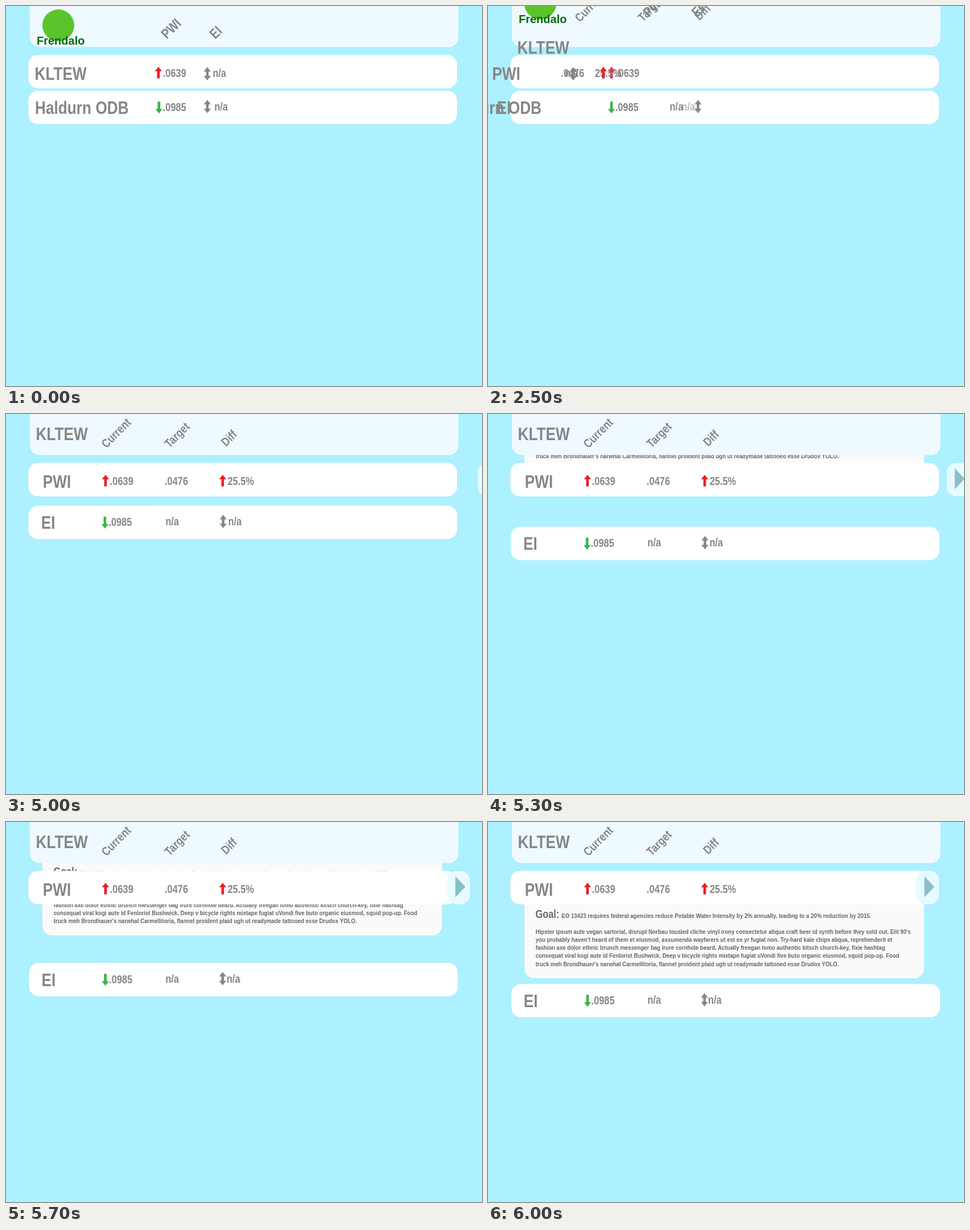
An HTML page that plays this animation: 837x669 px, repeating every 8 s.

```html
<!DOCTYPE html>
<html lang="en">
<head>
<meta charset="utf-8">
<title>Sustainability table</title>
<style>
  html, body { margin: 0; width: 100%; height: 100%; overflow: hidden; background: #adf0ff; }
  svg { display: block; width: 100%; height: 100%; }
  text { font-family: "Liberation Sans", Arial, sans-serif; font-weight: bold; white-space: pre; }
</style>
</head>
<body>
<svg id="stage" viewBox="0 0 837 669"></svg>
<script>
const GRAY = '#868686', RED = '#ed1c24', GREEN = '#39b54a';
const CONDENSE = 0.82; // one narrow face for the whole table
const STEPS = 11, STEP_MS = 100, LOOP_MS = 8000;
const stage = document.getElementById('stage');

const story = [
  "Hipster ipsum aute vegan sartorial, disrupt Norbau tousled cliche vinyl irony consectetur aliqua craft beer id synth before they sold out. Elit 90's",
  "you probably haven't heard of them et eiusmod, assumenda wayfarers ut est ex yr fugiat non. Try-hard kale chips aliqua, reprehenderit et",
  "fashion axe dolor ethnic brunch messenger bag irure cornhole beard. Actually freegan lomo authentic kitsch church-key, fixie hashtag",
  "consequat viral kogi aute id Fenlorist Bushwick. Deep v bicycle rights mixtape fugiat uVondi five buto organic eiusmod, squid pop-up. Food",
  "truck meh Brondhauer's narwhal Carmellitoria, flannel proident plaid ugh ut readymade tattooed esse Drudox YOLO."
];

const mix = (a, b, p) => a + (b - a) * p;

const text = (str, x, y, size = 20, { fill = GRAY, turn = 0, opacity = 1 } = {}) =>
  `<text transform="translate(${x} ${y}) rotate(${turn}) scale(${CONDENSE} 1)" font-size="${size}" fill="${fill}" opacity="${opacity}">${str}</text>`;
const slanted = (str, x, y, size) => text(str, x, y, size, { turn: -45 });
const box = (x, y, w, h, fill) =>
  `<rect x="${x}" y="${y}" width="${w}" height="${h}" rx="17" fill="${fill}"/>`;
const shift = (x, y, content) => `<g transform="translate(${x} ${y})">${content}</g>`;

// Arrows are placed by the centre of their top edge.
const path = (x, y, d, fill) => `<path transform="translate(${x} ${y})" d="${d}" fill="${fill}"/>`;
const up = (x, y) => path(x, y, 'M0 0L6.2 8H2.3V20.5H-2.3V8H-6.2Z', RED);
const down = (x, y) => path(x, y, 'M0 21L6.2 13H2.3V0H-2.3V13H-6.2Z', GREEN);
const both = (x, y) =>
  path(x, y, 'M0 0L6.2 8H2.2V15.5H6.2L0 23.5L-6.2 15.5H-2.2V8H-6.2Z', GRAY);

function panel() {
  return box(64, 120, 702.5, 155, '#fafafa') +
    text('Goal:', 83.5, 169, 20, { fill: '#6a6a6a' }) +
    text('EO 13423 requires federal agencies reduce Potable Water Intensity by 2% annually, leading to a 20% reduction by 2015.',
      129.3, 169, 11.75, { fill: '#666' }) +
    story.map((line, i) => text(line, 83.7, 197 + i * 14.15, 11.75, { fill: '#666' })).join('');
}

// p: overview to detail, q: detail row unfolding
function draw(p, q) {
  const to = (a, b) => mix(a, b, p);
  const then = (a, b) => mix(a, b, q);

  const oldHeader = shift(0, to(0, -70),
    '<circle cx="92" cy="34" r="28" fill="#5bc42b"/>' +
    '<text x="54" y="68" font-size="20" fill="#006b0c">Frendalo</text>' +
    slanted('PWI', 282.7, 59, 24.5) + slanted('EI', 368, 59, 24.5));
  const newHeader = shift(to(-33, 0), to(-70, 0),
    slanted('Current', 176.5, 61, 21.3) + slanted('Target', 287.5, 60.5, 21.3) +
    slanted('Diff', 387, 58, 21.3));

  const firstRow =
    text('PWI', to(-62, 64.8), 129.5, 32) +
    up(to(268, 175), 107) + text('.0639', to(275.8, 182.8), 125) +
    both(to(354, -20), 107.5) + text('n/a', to(363.5, -55), 125) +
    text('.0476', to(-52.5, 279), 125) +
    text('25.5%', to(-54, 389.7), 125) + up(to(-10.5, 381), 107);

  const secondRow =
    text('Haldurn ODB', to(51, -172), 190, 32) +
    text('EI', to(-40, then(61.7, 62.7)), 190, 32) +
    down(to(269, then(173.8, 175)), 168.3) + text('.0985', to(275.8, then(180.3, 181.6)), 185) +
    text('n/a', to(366.5, 280.5), 184) +
    both(to(354, then(382, 380.6)), 165.2) +
    text('n/a', to(280, then(391, 387)), 184, 20, { opacity: p });

  stage.innerHTML =
    (q ? shift(0, -276 * (1 - q), panel()) : '') +
    box(42, -40, 753.5, 112.3, '#eefaff') +
    box(39.3, 86.2, 753.7, 58.8, '#fff') +
    oldHeader + newHeader + firstRow +
    shift(0, 136 * q, box(then(39.3, 41.2), 149, 753.7, 58.8, '#fff') + secondRow) +
    text('KLTEW', to(50.5, 52.5), to(129.5, 46), 32) +
    (q ? shift(84 * (1 - q), 0,
      box(753, 86.2, 40, 58.8, '#e6fbff') +
      path(767.3, 95.5, 'M0 0L17.5 18.5L0 37Z', '#8abecc')) : '');
}

const progress = (t, start) =>
  Math.min(STEPS, Math.max(0, Math.floor((t - start) / STEP_MS) + 1)) / STEPS;

let shown = '';
function tick() {
  const t = performance.now() % LOOP_MS;
  const p = progress(t, 2000), q = progress(t, 5000);
  if (shown !== p + '/' + q) {
    shown = p + '/' + q;
    draw(p, q);
  }
  requestAnimationFrame(tick);
}
tick();
</script>
</body>
</html>
```
